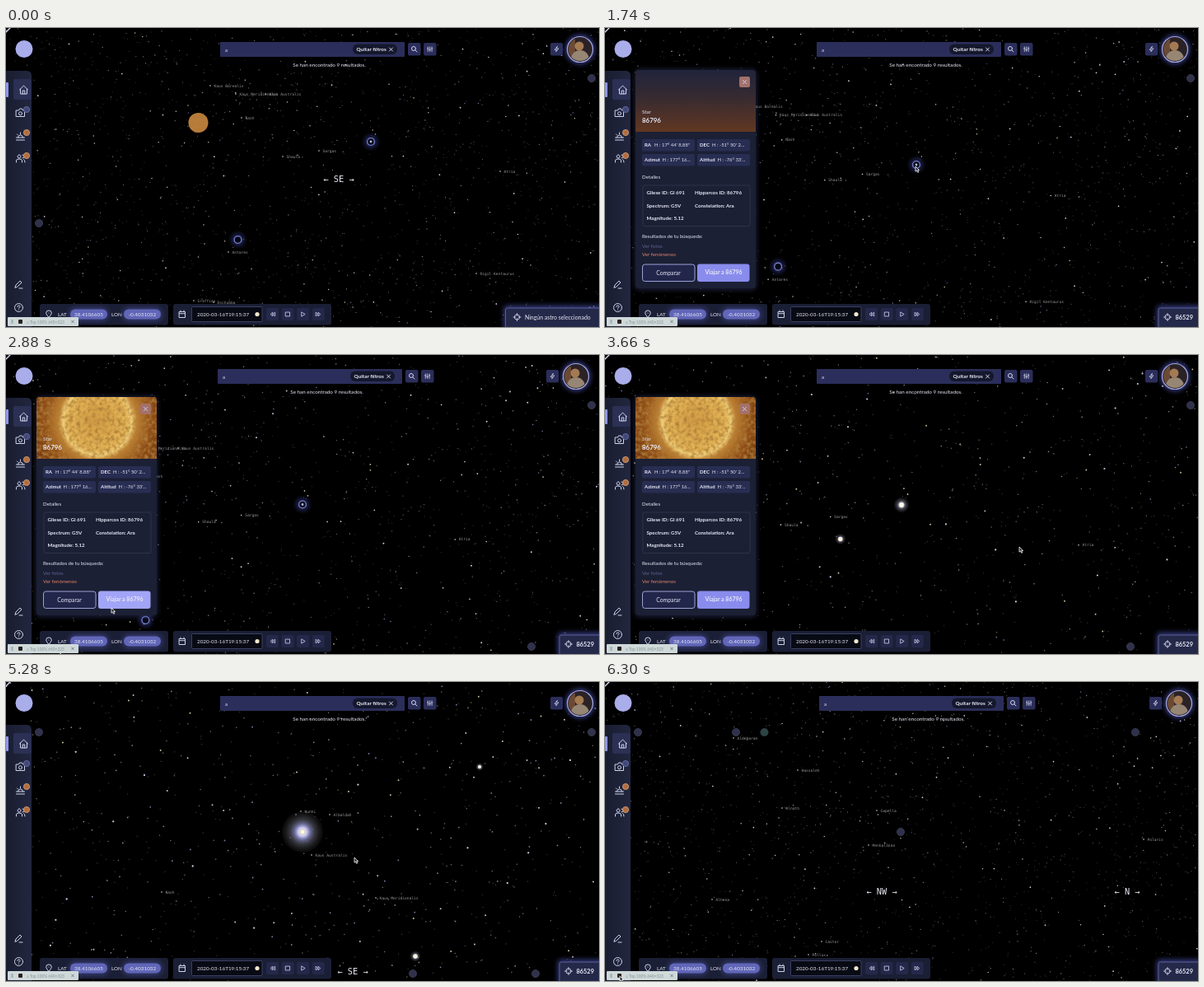
Animation, 720 px wide and 363 px high, one loop 6360 ms. Source, as an HTML page:

```html
<!DOCTYPE html>
<html lang="es">
<head>
<meta charset="utf-8">
<title>Mapa estelar</title>
<style>
html, body { margin: 0; width: 100%; height: 100%; overflow: hidden; background: #000; }
svg { display: block; width: 100vw; height: 100vh; }
text { font-family: Lato, "Open Sans", sans-serif; fill: #e6e8f5; }
.mono { font-family: "DejaVu Sans Mono", "Noto Sans Mono", monospace; font-size: 4.6px; fill: #96969c; }
.compass { font-size: 10.3px; fill: #e9eaf4; }
.bold { font-weight: 700; }
.line { fill: none; stroke: #cfd3ea; stroke-linecap: round; stroke-linejoin: round; }
#stars path { fill: none; stroke-linecap: round; }
</style>
</head>
<body>
<svg viewBox="0 0 720 363" preserveAspectRatio="none">
  <defs>
    <filter id="blur" x="-40%" y="-40%" width="180%" height="180%"><feGaussianBlur stdDeviation="3"/></filter>
    <filter id="grain" x="0" y="0" width="100%" height="100%">
      <feTurbulence type="fractalNoise" baseFrequency=".22" numOctaves="3" seed="4"/>
      <feColorMatrix values="0 0 0 0 .42  0 0 0 0 .2  0 0 0 0 .04  2.2 0 0 0 -.85"/>
      <feComposite in2="SourceGraphic" operator="in"/>
      <feMerge><feMergeNode in="SourceGraphic"/><feMergeNode/></feMerge>
    </filter>
    <radialGradient id="halo">
      <stop offset="0" stop-color="#fff"/><stop offset=".2" stop-color="#cccdf8"/>
      <stop offset=".4" stop-color="#7f80b4" stop-opacity=".8"/>
      <stop offset=".6" stop-color="#6d6d80" stop-opacity=".5"/>
      <stop offset="1" stop-color="#444" stop-opacity=".12"/>
    </radialGradient>
    <radialGradient id="ringGlow">
      <stop offset=".2" stop-color="#4d55b8" stop-opacity=".55"/><stop offset="1" stop-color="#30378a" stop-opacity="0"/>
    </radialGradient>
    <radialGradient id="sun" gradientUnits="userSpaceOnUse" cx="111" cy="80" r="80">
      <stop offset="0" stop-color="#d29c45"/><stop offset=".45" stop-color="#e3b557"/>
      <stop offset=".52" stop-color="#efcd78"/><stop offset=".6" stop-color="#bd8032"/>
      <stop offset=".78" stop-color="#95531b"/><stop offset="1" stop-color="#7a3d12"/>
    </radialGradient>
    <linearGradient id="dusk" x2="0" y2="1">
      <stop offset="0" stop-color="#21243b"/><stop offset=".35" stop-color="#352a31"/><stop offset="1" stop-color="#713c1d"/>
    </linearGradient>
    <linearGradient id="side"><stop offset="0" stop-color="#191d31"/><stop offset="1" stop-color="#22273f"/></linearGradient>
    <clipPath id="heroClip"><rect x="37" y="51" width="146" height="75"/></clipPath>
    <clipPath id="faceClip"><circle cx="697" cy="26" r="14"/></clipPath>
  </defs>
  <rect width="720" height="363"/>
  <g id="stars"></g>
  <g id="sky"></g>
  <g id="ui"></g>
  <g id="search"></g>
  <g id="account"></g>
  <g id="card"></g>
  <g id="footer"></g>
  <path id="cursor" d="M0 0V6.2L1.5 4.9L2.7 7.3L3.8 6.8L2.7 4.5H4.5Z" fill="#23242c" stroke="#fff" stroke-width=".8"/>
</svg>
<script>
const LOOP = 6360, STEP = 60;
const SELECT = 1560, LOADED = 2040, TRAVEL = 3000, CLOSE = 4920, RESET = 5760;
const $ = id => document.getElementById(id);

function add(parent, tag, attrs = {}, content = '') {
  const el = document.createElementNS('http://www.w3.org/2000/svg', tag);
  for (const k in attrs) el.setAttribute(k, attrs[k]);
  el.textContent = content;
  parent.append(el);
  return el;
}
const group = (parent, attrs) => add(parent, 'g', attrs);
const box = (p, x, y, width, height, fill, rx = 2, more = {}) =>
  add(p, 'rect', { x, y, width, height, fill, rx, ...more });
const dot = (p, cx, cy, r, fill, more = {}) => add(p, 'circle', { cx, cy, r, fill, ...more });
const words = (p, x, y, content, size = 6, more = {}) =>
  add(p, 'text', { x, y, 'font-size': size, ...more }, content);
const BOLD = { class: 'bold' }, MID = { 'text-anchor': 'middle' };
const icon = (p, x, y, d, scale = 1) =>
  add(p, 'path', { d, class: 'line', transform: `translate(${x} ${y}) scale(${scale})` });
const CROSS = 'M-2-2L2 2M2-2L-2 2';
const show = (el, on) => el.setAttribute('display', on ? 'inline' : 'none');
const place = (el, x, y) => el.setAttribute('transform', `translate(${x.toFixed(2)} ${y.toFixed(2)})`);

const clamp = v => Math.max(0, Math.min(1, v));
const smooth = v => { const p = clamp(v); return p * p * (3 - 2 * p); };

// keys: [time, x, y] stops
function at(keys, t, ease = clamp) {
  const i = keys.findIndex(k => k[0] > t);
  if (i <= 0) return keys.at(i).slice(1);
  const [t0, x0, y0] = keys[i - 1], [t1, x1, y1] = keys[i];
  const f = ease((t - t0) / (t1 - t0));
  return [x0 + (x1 - x0) * f, y0 + (y1 - y0) * f];
}

let seed = 86796;
const rnd = () => (seed = (seed * 16807) % 2147483647) / 2147483647;

// Camera: the view centres on the chosen star, closes in on it, then swings past its neighbours
const HOME = [443, 138];
const focus = t => at([[0, ...HOME], [1740, 378, 166], [2880, 360, 181.5]], t);
const zoom = t => t < RESET ? Math.min(1.5, 1 + .18 * (t / 2880) ** 3) : 1;
const swing = t => at([[3720, 0, 0], [4500, 135, 96], [5280, 320, 166], [RESET, 433, 209]], t);
const [swungX, swungY] = swing(5280);

const scenes = {
  far(x, y, t) {
    const [fx, fy] = focus(t), [sx, sy] = swing(t), z = zoom(t);
    return [fx + (x - HOME[0]) * z + sx, fy + (y - HOME[1]) * z + sy];
  },
  near(x, y, t, depth) {
    const [sx, sy] = swing(t);
    return [x + (sx - swungX) * depth, y + (sy - swungY) * depth];
  },
  west: (x, y, t) => [x + (6300 - t) * .1, y - (6300 - t) * .016],
  fixed: (x, y) => [x, y]
};

// Background stars: the brighter, the fewer and larger
const classes = [0, 1, 2, 3, 4].map(k => ({
  size: .9 + .2 * k,
  points: Array.from({ length: 1150 * .43 ** k }, () => [rnd() * 720, rnd() * 363]),
  el: add($('stars'), 'path', { stroke: `hsl(${k % 2 ? 45 : 240} ${k * 8}% ${28 + 14 * k}%)` })
}));
const wrap = (v, n) => ((v % n) + n) % n;
function drawStars(t) {
  const z = zoom(t), [fx, fy] = t < RESET ? focus(t) : scenes.west(0, 0, t), [sx, sy] = swing(t);
  for (const c of classes) {
    let d = '';
    for (const [x, y] of c.points) {
      const px = 360 + (wrap(x + fx + sx / z, 720) - 360) * z;
      const py = 182 + (wrap(y + fy + sy / z, 363) - 182) * z;
      if (px > 0 && px < 720 && py > 0 && py < 363) d += `M${px.toFixed(1)} ${py.toFixed(1)}h.01`;
    }
    c.el.setAttribute('d', d);
    c.el.setAttribute('stroke-width', c.size * (.3 + .7 * z));
  }
}

const movers = [];
function mover(scene, from, to, x, y, depth = 1) {
  const el = group($('sky'));
  movers.push({ el, from, to, pos: t => scenes[scene](x, y, t, depth) });
  return el;
}
function labels(scene, from, to, list) {
  for (const [name, x, y] of list) {
    const g = mover(scene, from, to, x, y);
    dot(g, 0, 0, .8, '#d8d8d8');
    add(g, 'text', { x: 4.5, y: 1.5, class: 'mono' }, name);
  }
}
labels('far', 0, TRAVEL, [
  ['Kaus Borealis', 248, 70], ['Kaus Meridionalis', 279, 80], ['Kaus Australis', 315, 80], ['Nash', 286, 109],
  ['Rigil Kentaurus', 571, 298], ['Antares', 270, 272], ['Graffias', 228, 331], ['Dschubba', 252, 333]
]);
labels('far', 0, CLOSE, [['Shaula', 336, 156], ['Sargas', 380, 149], ['Atria', 600, 174]]);
labels('near', 4020, RESET, [
  ['Nunki', 358, 157], ['Albaldah', 393, 161], ['Kaus Australis', 371, 210],
  ['Kaus Meridionalis', 449, 262], ['Nash', 189, 255]
]);
labels('west', RESET, LOOP, [
  ['Aldebaran', 156, 68], ['Hassaleh', 234, 107], ['Alnath', 215, 153], ['Capella', 330, 156],
  ['Menkalinan', 320, 198], ['Polaris', 654, 191], ['Alhena', 130, 264], ['Castor', 263, 315], ['Pollux', 247, 331]
]);

function compass(name, ...where) {
  add(mover(...where), 'text', { y: 3.7, 'text-anchor': 'middle', class: 'mono compass' }, `← ${name} →`);
}
compass('SE', 'far', 0, 1200, 404, 183);
compass('SE', 'near', CLOSE, RESET, 421, 351);
compass('NW', 'west', RESET, LOOP, 336, 254);
compass('N', 'west', RESET, LOOP, 634, 254);

const planet = mover('far', 0, TRAVEL, 233.5, 115);
dot(planet, 0, 0, 12, '#b97b3b', { filter: 'url(#grain)' });

function ring(x, y) {
  const g = mover('far', 0, TRAVEL, x, y);
  dot(g, 0, 0, 12, 'url(#ringGlow)');
  dot(g, 0, 0, 4.4, '#060714', { stroke: '#747cc6', 'stroke-width': 1.4 });
  return g;
}
dot(ring(...HOME), 0, 0, 1.4, '#b4b8e4');
ring(281.5, 257);

const sun = mover('fixed', TRAVEL, RESET, 360, 182);
const halo = dot(sun, 0, 0, 8, 'url(#halo)');
dot(sun, 0, 0, 3.2, '#fffbe6', { stroke: '#b7ae8c', 'stroke-width': .6 });
for (const [x, y, r] of [[497, 333, 2.7], [575, 103, 2]]) {
  const g = mover('near', 3300, RESET, x, y, .66);
  dot(g, 0, 0, r * 2.4, 'url(#halo)');
  dot(g, 0, 0, r, '#fff4da');
}

const blob = (fill, ...where) => dot(mover(...where), 0, 0, 4.6, fill, { stroke: '#464866', 'stroke-width': .6 });
const SLATE = '#30314a';
blob(SLATE, 'fixed', 0, RESET, 711, 61);
blob(SLATE, 'fixed', 0, 1320, 40, 237);
blob(SLATE, 'fixed', 2400, 4200, 638, 354);
blob(SLATE, 'fixed', CLOSE, LOOP, 40, 61);
for (const x of [494, 643]) blob(SLATE, 'fixed', CLOSE, RESET, x, 354);
for (const x of [159, 644]) blob(SLATE, 'west', RESET, LOOP, x, 61);
blob('#2b4543', 'west', RESET, LOOP, 193.5, 61);
blob(SLATE, 'fixed', RESET, LOOP, 359, 182);

// Sidebar and mark
const ui = $('ui');
dot(ui, 22, 25.5, 10.5, '#a9adea');
add(ui, 'path', { d: 'M0 5L5 0', class: 'line', 'stroke-width': 1.5 });
add(ui, 'path', { d: 'M0 52H25q6 0 6 6V363H0z', fill: 'url(#side)' });
box(ui, 9, 62, 22, 25, '#2b3054');
box(ui, 0, 66, 3, 18, '#8f95ea', 1);
icon(ui, 21.5, 75, 'M-5 0L0-5L5 0M-4-1V5H4V-1M-1.3 5V1H1.3V5');
icon(ui, 17.5, 103, 'M-5-3H-2L-1-5H2L3-3H5V4.5H-5zM2 .8A2 2 0 1 1-2 .8A2 2 0 1 1 2 .8');
icon(ui, 17.5, 131, 'M-5 5H5M-5 2H5M-3 2A3 3 0 0 1 3 2M0-4V-2M-4-2L-3-1');
icon(ui, 17.5, 158, 'M-5 5V3Q-5 1-1.5 1T2 3V5M-1.5-4A2 2 0 1 0-1.4-4M2.5-4A2 2 0 0 1 2.5 0M4 1.5Q5.5 2 5.5 5');
['#414879', '#b06d40', '#b06d40'].forEach((fill, i) =>
  dot(ui, 25, 99 + 28 * i, 3.6, fill, { stroke: i ? '#dda27b' : '#6b72ad', 'stroke-width': .8 }));
icon(ui, 15, 311, 'M-4 4L-3 1L2-4L4-2L-1 3zM1 5H5');
icon(ui, 15.5, 339.5, 'M5 0A5 5 0 1 1-5 0A5 5 0 1 1 5 0M-1.5-1Q-1.5-2.7 0-2.7T1.5-1Q1.5 0 0 .7M0 2.6v.1');

// Search bar
const search = $('search');
box(search, 260, 17, 224, 18, '#2b2e5a', 1);
words(search, 266, 28.5, 'a');
box(search, 421, 19.5, 54, 12.5, '#15182c', 6);
words(search, 425.5, 28, 'Quitar filtros', 6.4, BOLD);
icon(search, 467.5, 26, CROSS);
for (const x of [488, 507]) box(search, x, 18, 15.5, 15.5, '#2b2e5a');
icon(search, 495.5, 25.5, 'M2-.5A2.5 2.5 0 1 1-3-.5A2.5 2.5 0 1 1 2-.5M1.5 1.5L3.5 3.5');
icon(search, 514.7, 25.7, 'M-3-3.5V3.5M0-3.5V3.5M3-3.5V3.5M-4-1H-2M-1 1H1M2-1H4', .8);
words(search, 392.5, 47, 'Se han encontrado 9 resultados.', 6.3, MID);

// Account corner: portrait as a plain silhouette
const account = $('account');
box(account, 661, 18, 15, 15.5, '#2b2e5a');
icon(account, 668.5, 25.7, 'M1-4L-3 1H0L-1 4L3-1H0z', .8);
dot(account, 697, 26, 17.5, '#4d55b5', { filter: 'url(#blur)', opacity: .8 });
dot(account, 697, 26, 15.5, '#2a2226', { stroke: '#a4a9e2', 'stroke-width': 1.2 });
const face = group(account, { 'clip-path': 'url(#faceClip)' });
box(face, 682, 11, 9, 30, '#6b4a35', 0);
dot(face, 697, 38, 11, '#978674');
dot(face, 696, 22, 5.5, '#a47a52');

// Detail card
const card = $('card');
box(card, 36, 50, 148, 268, '#343a6b', 6, { filter: 'url(#blur)', opacity: .55 });
box(card, 37, 51, 146, 265, '#1c2035', 4);
const hero = group(card, { 'clip-path': 'url(#heroClip)' });
box(hero, 37, 51, 146, 90, 'url(#dusk)', 4);
const photo = box(hero, 37, 51, 146, 90, 'url(#sun)', 4, { filter: 'url(#grain)' });
box(card, 163, 59, 13, 13, '#a4716a');
icon(card, 169.5, 65.5, CROSS);
words(card, 45, 104, 'Star', 6.2);
words(card, 45, 115, '86796', 7.9, BOLD);
[['RA', 'H : 17° 44\' 8.88"', 12], ['DEC', "H : -51° 50' 2…", 15],
 ['Azimut', 'H : 177° 16…', 21.5], ['Altitud', "H : -76° 33'…", 21.5]].forEach(([name, value, gap], i) => {
  const x = 45 + 67 * (i % 2), y = 135 + 18 * (i >> 1);
  box(card, x, y, 64, 14.5, '#282d52');
  words(card, x + 3, y + 9.3, name, 6, BOLD);
  words(card, x + 3 + gap, y + 9.3, value, 5.9);
});
words(card, 45, 183, 'Detalles', 6.2);
box(card, 46, 191, 130, 49.5, 'none', 2, { stroke: '#34384f', 'stroke-width': .8 });
['Gliese ID: Gl 691', 'Hipparcos ID: 86796', 'Spectrum: G5V', 'Constelation: Ara', 'Magnitude: 5.12'].forEach((s, i) =>
  words(card, 50.5 + 58.5 * (i % 2), 202 + 15.5 * (i >> 1), s, 6.2, BOLD));
words(card, 45, 254.5, 'Resultados de tu búsqueda:', 6.1);
words(card, 45, 267, 'Ver fotos', 6.2, { style: 'fill:#5c628e' });
words(card, 45, 276.5, 'Ver fenómenos', 6.2, { style: 'fill:#df8069' });
box(card, 45.5, 287, 63.5, 20.5, '#22264a', 3, { stroke: '#9aa0d6' });
words(card, 77, 299.5, 'Comparar', 6.8, MID);
const travel = box(card, 112, 286.5, 63.5, 21.5, '#898cec', 3);
words(card, 144, 299.2, 'Viajar a 86796', 7, { ...BOLD, ...MID });

// Footer
const footer = $('footer');
for (const [x, w] of [[41, 156], [203, 192]]) box(footer, x, 335, w, 25.5, '#1b1f35', 3);
icon(footer, 52, 347.5, 'M0 4Q-3.3 0-3.3-1.3A3.3 3.3 0 0 1 3.3-1.3Q3.3 0 0 4M0-1.5v.1');
[['LAT', '38.4106605'], ['LON', '-0.4031032']].forEach(([name, value], i) => {
  const x = 63 + 65 * i;
  words(footer, x, 350, name, 6.3);
  box(footer, x + 14, 340, 47, 15, '#5156b2', 7, { filter: 'url(#blur)', opacity: .6 });
  box(footer, x + 15, 341.5, 45, 12, '#6166b8', 6);
  words(footer, x + 37.5, 349.8, value, 6.4, MID);
});
icon(footer, 214, 347.5, 'M-3.5-3H3.5V4H-3.5zM-3.5-.8H3.5M-2-4.5V-3M2-4.5V-3');
box(footer, 225.5, 338.5, 85.5, 18, '#080a14', 1, { stroke: '#444a70', 'stroke-width': .8 });
words(footer, 232, 350, '2020-03-16T19:15:37', 6.35);
dot(footer, 305, 347.5, 2.6, '#f4e7cb');
const forward = 'M0-2.5L3 0L0 2.5zM-3.5-2.5L-.5 0L-3.5 2.5z';
['M0-2.5L-3 0L0 2.5zM3.5-2.5L.5 0L3.5 2.5z', 'M-3-3H3V3H-3z', 'M-2-3L3 0L-2 3z', forward].forEach((d, i) => {
  box(footer, 316 + i * 18.6, 340, 15, 15, '#24284a');
  icon(footer, 323.5 + i * 18.6, 347.5, d, .82);
});

function badge(x, text, size, gap, more) {
  const g = group(footer);
  box(g, x - 2, 337, 730 - x, 30, '#4d54b2', 4, { filter: 'url(#blur)', opacity: .7 });
  box(g, x, 340, 730 - x, 30, '#252949', 2, { stroke: '#666da9', 'stroke-width': .8 });
  icon(g, x + gap, 351, 'M3.5 0A3.5 3.5 0 1 1-3.5 0A3.5 3.5 0 1 1 3.5 0M-5 0H-2M2 0H5M0-5V-2M0 2V5', .9);
  words(g, x + gap + 9.5, 353.6, text, size, more);
  return g;
}
const emptyBadge = badge(606.5, 'Ningún astro seleccionado', 6.9, 14);
const pickedBadge = badge(672, '86529', 7.4, 11, BOLD);

// Recorder strip
box(footer, 2, 351, 86, 11, '#cfd9d9', 1);
box(footer, 15, 354, 5, 5, '#2a211f', 1);
box(footer, 6, 354, 3, 5, '#aab7b8', 0);
words(footer, 25, 358.5, '□  Top 100%  640×323', 4.8, { style: 'fill:#849194' });
icon(footer, 81, 356.5, CROSS, .7).setAttribute('style', 'stroke:#59646a');

const pointerStops = [
  [1200, 398, 195], [1680, 377, 168], [1860, 377, 168], [2760, 128, 307], [2940, 128, 307],
  [3660, 503, 233], [4500, 433, 213], [CLOSE, 169, 66], [5280, 423, 213], [6240, 18, 357]
];

function draw(t) {
  drawStars(t);
  for (const m of movers) {
    const on = t >= m.from && t < m.to;
    show(m.el, on);
    if (on) place(m.el, ...m.pos(t));
  }
  const picked = t >= SELECT, open = picked && t < CLOSE;
  halo.setAttribute('r', Math.min(5 + 20 * smooth((t - TRAVEL) / 2200), 5 + 20 * clamp((RESET - t) / 400)));
  show(card, open);
  show(photo, t >= LOADED);
  travel.setAttribute('fill', t > 2640 && t < 3060 ? '#a2a4f7' : '#898cec');
  place(search, open ? -3 : 0, 0);
  place(account, open ? -5 : 0, 0);
  show(emptyBadge, !picked);
  show(pickedBadge, picked);
  show($('cursor'), t >= 1200);
  place($('cursor'), ...at(pointerStops, t, smooth));
}

const start = performance.now();
function tick() {
  const t = (performance.now() - start) % LOOP;
  draw(Math.floor(t / STEP) * STEP);
  requestAnimationFrame(tick);
}
tick();
</script>
</body>
</html>
```
